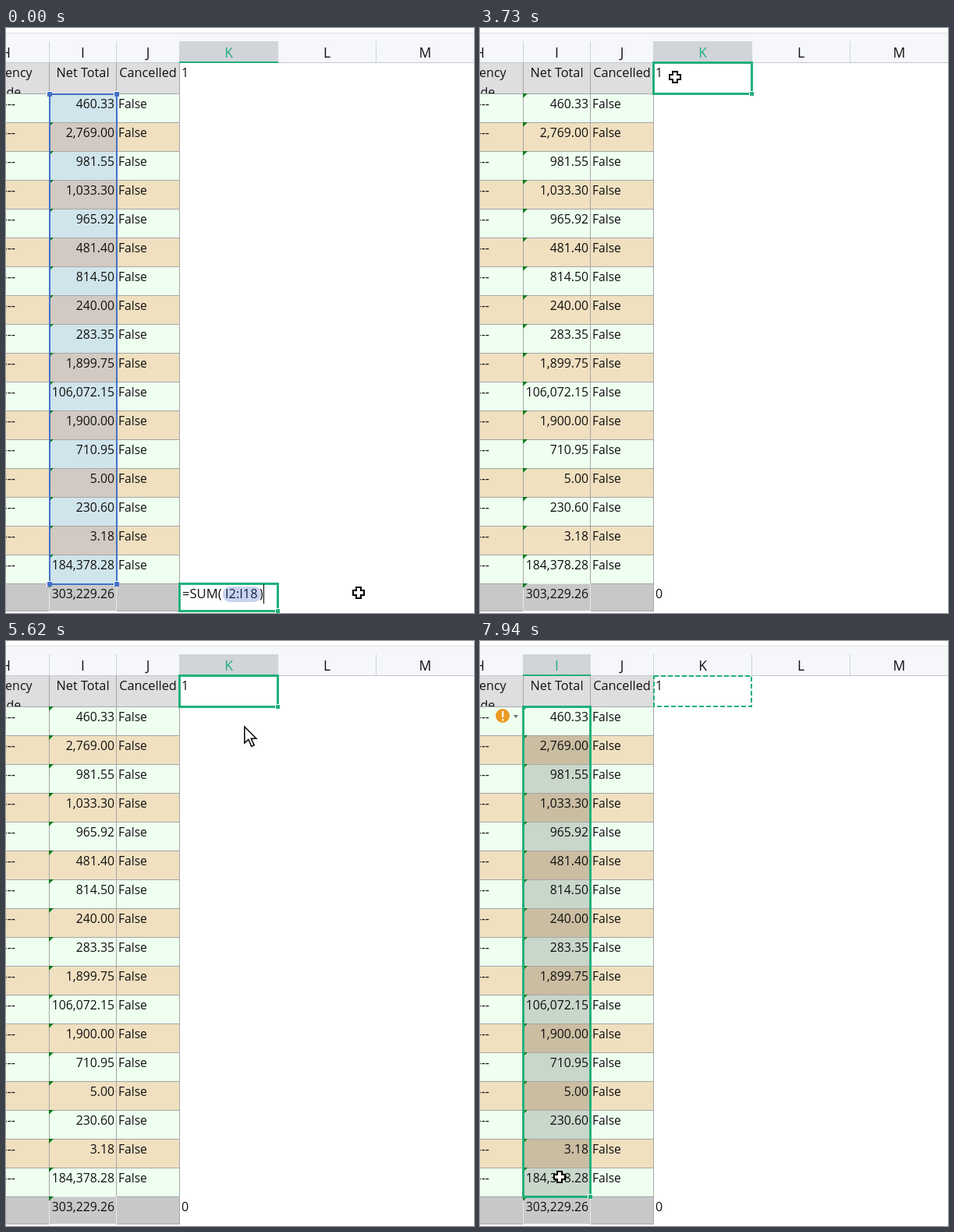
These frames come from a looping animation (600x751 px, 8000 ms). An HTML page with a canvas:

```html
<!DOCTYPE html>
<html lang="en">
<head>
<meta charset="utf-8">
<title>Spreadsheet</title>
<style>
html, body { margin: 0; width: 100%; height: 100%; overflow: hidden; background: #fff; }
canvas { display: block; }
</style>
</head>
<body>
<canvas id="stage" width="600" height="751"></canvas>
<script>
const ctx = document.getElementById('stage').getContext('2d');
const LOOP = 8000, ROW = 37, TOP = 84, BOTTOM = 713;
const GREEN = '#21b07b', BLUE = '#4270c8', INK = '#3a3e45', GRID = '#a6a6a6';
const FONT = '"Open Sans", "Noto Sans", sans-serif';
const totals = ['460.33', '2,769.00', '981.55', '1,033.30', '965.92', '481.40', '814.50', '240.00', '283.35',
  '1,899.75', '106,072.15', '1,900.00', '710.95', '5.00', '230.60', '3.18', '184,378.28'];
const columns = { H: [-57, 55], I: [55, 141], J: [141, 222], K: [222, 348], L: [348, 474], M: [474, 600] };

// Pointer path: time, x, y
const path = [
  [0, 452, 725], [690, 452, 725], [1150, 320, 743], [1500, 392, 736], [1700, 401, 733], [2100, 399, 732],
  [2640, 399, 732], [2760, 393, 690], [2900, 364, 390], [3050, 330, 110], [3250, 280, 82], [3470, 250, 63],
  [4060, 250, 62], [4470, 250, 62], [4750, 284, 98], [4950, 304, 118], [5090, 305, 109],
  [5960, 305, 109], [6300, 130, 100], [6600, 112, 104], [6800, 118, 172], [6850, 122, 200],
  [7130, 137, 427], [7480, 102, 697], [7600, 102, 688], [8000, 102, 688]
];

const menu = [
  // label, x, y, shortcut, icon, flags: g = disabled, a = submenu arrow, s = split line
  ['Cut', 293, 82, 'Ctrl+X', 'M-8-9L5 5M8-9L-5 5M-9 7a3 3 0 1 0 6 0a3 3 0 1 0-6 0M3 7a3 3 0 1 0 6 0a3 3 0 1 0-6 0', ''],
  ['Copy', 293, 113, 'Ctrl+C', 'M-4-9h13v13h-13zM-4-5h-5v14h12v-5', ''],
  ['Paste', 293, 146, 'Ctrl+V', 'M-4-8h-4v15h5M4-3v-5h-3M-4-10h5v4h-5zM-2-2h11v11h-11z', 'g'],
  ['Paste Special...', 293, 179, '', 'M-4-8h-4v15h5M4-3v-5h-3M-4-10h5v4h-5zM1 0h8M1 8h3M6 8h3M9 3v2', 'g'],
  ['Format Painter', 293, 221, '', 'M-2-2v-7h4v7h5v10h-14v-10zM-7 3h14', ''],
  ['Insert', 291, 265, '', 'M-8-8h9v4h-9zM0-2h8v4h-8zM-9 0h6M-8 4h9v4h-9zM4-6h4', 'a'],
  ['Chart', 293, 297, '', 'M-8 2h5v6h-5zM-3-3h5v11h-5zM2-8h5v16h-5z', ''],
  ['Delete', 291, 327, '', '', 'a'],
  ['Clear Contents', 291, 359, '', 'M-2-3v-6h4v6M2-3h4v3M-2-3h-4l-2 11h8M-7 3h8M3 2l6 6M9 2l-6 6', 'as'],
  ['AutoFilter', 291, 402, '', 'M-8-8h16l-6 7v10l-4-3v-7z', 'as'],
  ['Sort', 291, 436, '', 'M-8 8l7-15v15zM-5 3h4M3-8v16h-2M7-8v16l-4-5', 'as'],
  ['Insert Comment', 293, 477, 'Shift+F2', 'M1-8h-9v17l4-4h13v-6M6-10v8M2-6h8', ''],
  ['Format Cells...', 293, 508, 'Ctrl+1', 'M-9-5h18M-5-9v17M-9 4h7M7-9v5M1 4a4 4 0 1 0 8 0a4 4 0 1 0-8 0M4 4h2M5-1v1M5 8v2', ''],
  ['Pick from Drop-down List...', 293, 547, '', '', ''],
  ['Hyperlink...', 293, 586, 'Ctrl+K', 'M-1 2l-2 0-5-5a3.6 3.6 0 0 1 5-5l5 5v3M1-2l2 0 5 5a3.6 3.6 0 0 1-5 5l-5-5v-3', ''],
  ['Synonyms', 291, 625, '', '', 'a'],
  ['Thesaurus...', 293, 655, 'Shift+F7', 'M-9-7h18v14h-18zM0-7v4M0 3v4M-6-3h3l-3 6h3M3-3l4 6M7-3l-4 6', ''],
  ['Define Name...', 293, 685, '', '', '']
];

function rect(x, y, w, h, color) {
  ctx.fillStyle = color;
  ctx.fillRect(x, y, w, h);
}

function frame(x, y, w, h, color, width = 1) {
  ctx.strokeStyle = color;
  ctx.lineWidth = width;
  ctx.strokeRect(x, y, w, h);
}

function text(str, x, y, size = 16, color = '#111', align = 'left', weight = 400) {
  ctx.font = `${weight} ${size}px ${FONT}`;
  ctx.textAlign = align;
  ctx.fillStyle = color;
  ctx.fillText(str, x, y);
}

function icon(d, x, y, color = INK, fill, width = 1.3) {
  const shape = new Path2D(d);
  ctx.save();
  ctx.translate(x, y);
  if (fill) { ctx.fillStyle = fill; ctx.fill(shape); }
  if (color) { ctx.strokeStyle = color; ctx.lineWidth = width; ctx.stroke(shape); }
  ctx.restore();
}

const caretDown = (x, y) => icon('M-3-2h6l-3 4z', x, y, null, '#6b7078');

function panel(x, y, w, h) {
  ctx.save();
  ctx.shadowColor = 'rgba(0,0,0,.22)';
  ctx.shadowBlur = 5;
  ctx.shadowOffsetY = 1;
  rect(x, y, w, h, '#fff');
  ctx.restore();
  frame(x + .5, y + .5, w - 1, h - 1, '#d0d4da');
}

function drawHeader(active) {
  rect(0, 6, 600, 38, '#f5f7fb');
  rect(0, 6, 600, 1, '#dcdfe4');
  rect(0, 44, 600, 1, '#c3c7cd');
  for (const [name, [left, right]] of Object.entries(columns)) {
    const on = name === active;
    rect(right, 17, 1, 27, '#cfd3d9');
    if (on) {
      rect(left, 17, right - left + 1, 27, '#d1d4d9');
      rect(left, 43, right - left + 1, 2, GREEN);
    }
    text(name, (left + right + 1) / 2, 38, 17.5, on ? GREEN : '#111', 'center');
  }
}

function drawTable(shade) {
  rect(0, 45, 222, 39, '#dedede');
  ctx.save();
  ctx.beginPath();
  ctx.rect(0, 45, 222, 39);
  ctx.clip();
  text('Currency', 0, 63, 16, '#111', 'center');
  text('Code', 0, 88, 16, '#111', 'center');
  text('Net Total', 98.5, 63, 16.3, '#111', 'center');
  text('Cancelled', 182, 63, 16.3, '#111', 'center');
  ctx.restore();

  for (let i = 0; i <= totals.length; i++) {
    const y = TOP + i * ROW, last = i === totals.length;
    rect(0, y, 222, last ? 36 : ROW, last ? '#c8c8c8' : i % 2 ? '#f0e0c0' : '#eefff0');
    if (shade && !last && (i || shade.first)) rect(57, y + 1, 84, ROW - 1, shade.color);
  }
  for (let i = 0; i <= totals.length + 1; i++) rect(0, TOP + i * ROW - (i > totals.length ? 2 : 0), 223, 1, GRID);
  for (const x of [55, 141, 222]) rect(x, 45, 1, 704, GRID);
  frame(55.5, BOTTOM + .5, 86, 35, '#e8e8e8');

  totals.concat('303,229.26').forEach((value, i) => {
    const y = TOP + i * ROW;
    icon('M0 0h6l-6 6z', 55, y, null, '#0b7a1c');
    text(value, 139, y + 19, 15.8, '#111', 'right');
    if (i === totals.length) return;
    text('---', 12, y + 19, 16, '#111', 'right');
    text('False', 144, y + 19, 15.6);
  });
  text('1', 225, 63);
}

function drawSelection(x, y, right, bottom) {
  frame(x + .5, y + .5, right - x, bottom - y, GREEN, 3);
  rect(right - 3, bottom - 3, 6, 6, '#fff');
  rect(right - 2, bottom - 2, 5, 5, GREEN);
}

function drawAnts(t) {
  ctx.save();
  ctx.setLineDash([6, 3]);
  ctx.lineDashOffset = -Math.round((t - 7130) / 45);
  frame(223, 45, 125, 39, GREEN, 2);
  ctx.restore();
}

function drawFormula(caret) {
  frame(56, 85, 86, 629, BLUE, 2);
  for (const x of [55, 141]) for (const y of [84, 713]) {
    rect(x - 3, y - 3, 7, 7, '#fff');
    rect(x - 2, y - 2, 6, 6, BLUE);
  }
  rect(222, 713, 127, 36, '#fff');
  drawSelection(222, 713, 348, 748);
  ctx.fillStyle = '#c9d4f1';
  ctx.beginPath();
  ctx.roundRect(278, 717, 49, 20, 9);
  ctx.fill();
  text('=SUM(', 226, 732, 16.6);
  text('I2:I18', 281, 732, 16.4, '#16223f');
  text(')', 325, 732);
  if (caret) rect(330, 714, 1, 25, '#000');
}

function drawToolbar() {
  panel(257, -10, 353, 57);
  frame(260.5, -8.5, 179, 18, '#cfd3d9');
  rect(353, 0, 1, 10, '#cfd3d9');
  text('Fenla UI', 261, 5, 12.3, INK);
  text('9', 357, 5, 12.3, INK);
  caretDown(347, 1);
  caretDown(431, 1);
  text('A', 452, 7, 19, INK, 'center');
  text('A', 479, 7, 19, INK, 'center');

  rect(258, 16, 28, 28, '#d5d8dd');
  rect(390, 16, 36, 28, '#d5d8dd');
  icon('M-5-9h-4v18h4M5-9h4v18h-4M-5-4h10M-5 1h9v5h-7M-1 4l-2 2 2 2', 271, 30);
  text('B', 300, 38, 22, INK, 'center', 700);
  icon('M-6 1l7-9 7 6-7 7h-6zM-6 5h3', 327, 28);
  rect(318, 35, 19, 4, '#f4e400');
  text('A', 366, 35, 19, INK, 'center');
  rect(357, 37, 18, 3, '#e02020');
  icon('M-9-8h18M-6-3h12M-9 2h18M-5 7h10', 404, 30);
  icon('M-9-9h18v18h-18zM0-9v18M-9 0h18', 441, 30);
  icon(menu[4][4], 480, 31);
  for (const x of [346, 383, 421, 459]) caretDown(x, 31);
  icon('M-13-9v24h26v-24M-13 4h26M-5 0l-4 4 4 4M5 0l4 4-4 4', 533, 0);
  icon('M8-8h-16l9 9-9 14h18', 597, 0);
  text('Merge', 509, 38, 13, INK);
  caretDown(554, 34);
  text('AutoSum', 569, 38, 13, INK);
}

function drawMenu(pointerY) {
  panel(252, 65, 272, 635);
  if (pointerY > 66) {
    const copy = pointerY > 98;
    rect(253, copy ? 98 : 67, 270, copy ? 32 : 31, '#e6e9ed');
  }
  for (const y of [198, 242, 379, 456, 527, 566, 605]) rect(253, y, 270, 1, '#e0e3e7');
  for (const [label, x, y, keys, shape, flags] of menu) {
    const off = flags.includes('g');
    text(label, x, y + 5, 12.3, off ? '#a9adb3' : '#30343a');
    text(keys, 506, y + 5, 12.3, off ? '#a9adb3' : '#777b82', 'right');
    if (shape) icon(shape, 272, y, off ? '#b4b8be' : INK);
    if (flags.includes('a')) icon('M-2-3l4 3-4 3z', 512, y - 1, null, '#6b7078');
    if (flags.includes('s')) rect(498, y - 7, 1, 12, '#d9dce1');
  }
  rect(484, 212, 1, 18, '#d9dce1');
  icon('M-1-3v-6h4v6h6v9h-13v-9zM-4 2h13M-4 0h-5v9h14v-3M-6 0v-6h3', 507, 221);
}

function drawWarning() {
  icon('M-9 0a9 9 0 1 0 18 0a9 9 0 1 0-18 0', 29, 96, null, '#ec9a22');
  rect(28, 90, 2.4, 8, '#fff');
  rect(28, 100, 2.4, 2.4, '#fff');
  caretDown(46, 97);
}

function pointerAt(t) {
  const i = path.findIndex(p => p[0] > t);
  const [t0, x0, y0] = path[i - 1], [t1, x1, y1] = path[i];
  const k = (t - t0) / (t1 - t0);
  return [x0 + (x1 - x0) * k, y0 + (y1 - y0) * k];
}

function drawPointer(x, y, arrow) {
  if (arrow) {
    icon('M.8 1v21l5-4.6 4 8.8 3.4-1.6-3.9-8.4h6.6z', x, y, '#000', '#fff', 1.5);
    return;
  }
  x = Math.round(x);
  y = Math.round(y);
  for (const [reach, half, color] of [[8, 4, '#000'], [6, 2, '#fff']]) {
    rect(x - reach, y - half, reach * 2, half * 2, color);
    rect(x - half, y - reach, half * 2, reach * 2, color);
  }
}

function draw(t) {
  const editing = t < 2300, menuOpen = t >= 4060 && t < 5420;
  const copied = t >= 5720, inTotals = t >= 6550, range = t >= 7670;
  const active = editing ? 'K' : t < 3600 ? 'L' : inTotals ? 'I' : 'K';
  const [x, y] = pointerAt(t);

  rect(0, 0, 600, 751, '#fff');
  drawHeader(active);
  drawTable(editing ? { color: 'rgba(50,90,205,.16)', first: true } : range && { color: 'rgba(0,0,0,.155)' });

  if (editing) {
    drawFormula(Math.floor((t + 510) / 525) % 2 === 0 || t < 540 || t >= 2100);
  } else {
    text('0', 225, 732);
    if (active === 'L') drawSelection(348, 713, 474, 748);
    if (active === 'K' && !copied) drawSelection(222, 44, 348, 84);
    if (copied) drawAnts(t);
    if (inTotals) {
      drawSelection(55, 84, 141, range ? 713 : 121);
      drawWarning();
    }
  }
  if (menuOpen) {
    drawToolbar();
    drawMenu(y);
  }
  drawPointer(x, y, t >= 4060 && t < 6000);
}

function tick() {
  draw(performance.now() % LOOP);
  requestAnimationFrame(tick);
}
tick();
</script>
</body>
</html>
```
